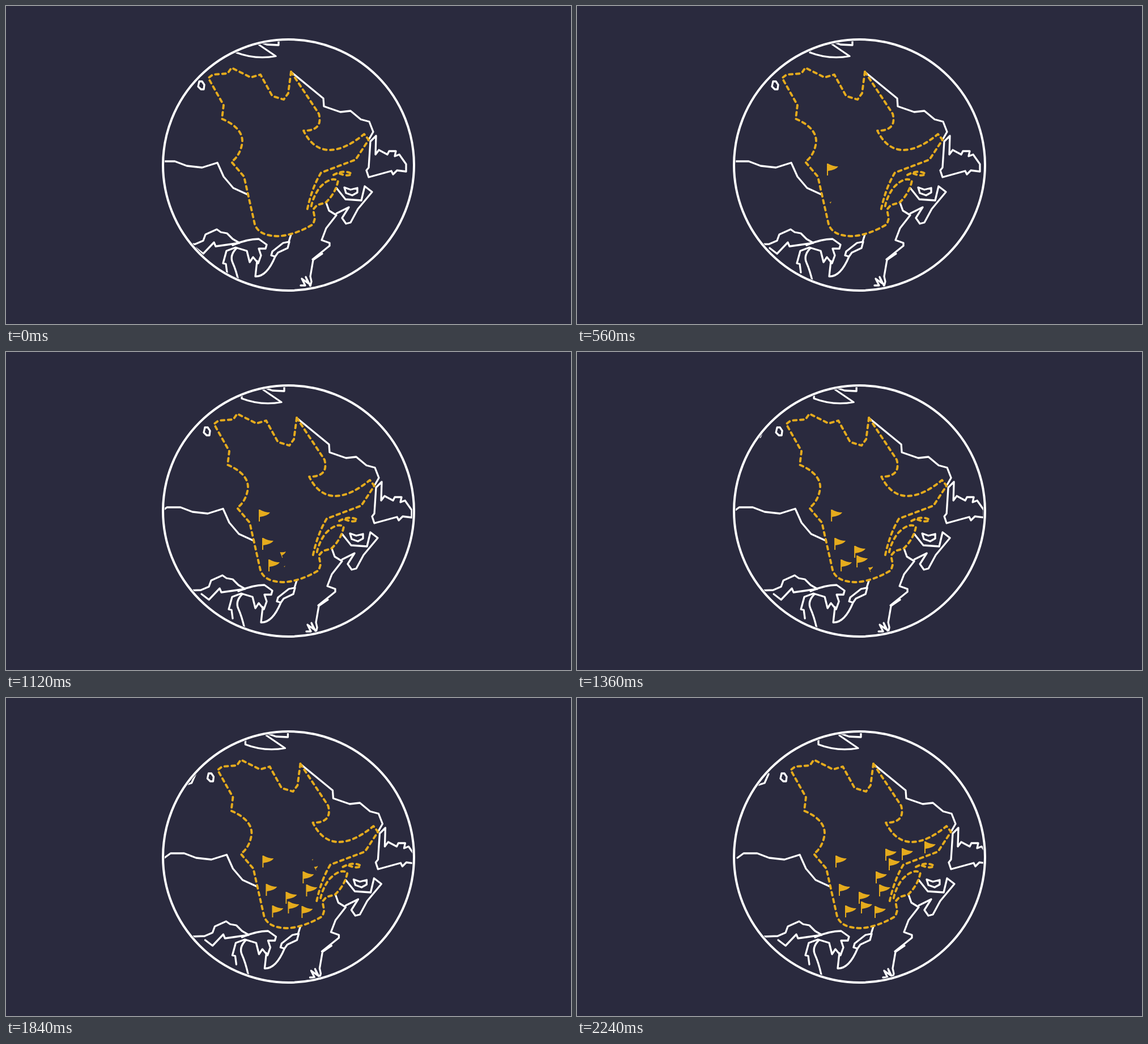
An HTML page for the animation above (2.28 s loop, 997 px wide and 561 px high).

```html
<!DOCTYPE html>
<html lang="en">
<head>
<meta charset="utf-8">
<title>Globe with flags</title>
<style>
  html, body { margin: 0; width: 100%; height: 100%; overflow: hidden; background: #2a2a3e; }
  svg { display: block; width: 997px; height: 561px; fill: none; stroke-linejoin: round; stroke-linecap: round; }
  .line { stroke: #fff; stroke-width: 3.3; }
  .dash { stroke: #e5ab1d; stroke-width: 3.9; stroke-dasharray: 6 6.5; }
  #flags { fill: #e5ab1d; }
</style>
</head>
<body>
<svg viewBox="0 0 997 561">
  <clipPath id="disc"><circle cx="498.5" cy="280.5" r="218.5"/></clipPath>
  <g clip-path="url(#disc)">
    <g id="map">
      <g class="line">
        <!-- northern islands -->
        <path d="M406 70V82Q440 95 476 88.5L443 66M443 62L460 68 481 69V58"/>
        <path d="M341 133H346L350 139 349 147H344L339 142Z"/>
        <path d="M318 134L311 150 298 154"/>
        <!-- western border -->
        <path d="M263 282L274 274H298L319 282 346 285 373 276.5 384 301 401 321 425 332"/>
        <!-- eastern coast and islands -->
        <path d="M505 118L560 163 561 177 590 187 608 185 626 200 641 204 648 222 640 236"/>
        <path d="M653 229L643 239 640 285 636 290 640 302 680 291 683 297 690 290 706 292V279L694 262 686 265 688 256H676L673 262 658 254 652 262Z"/>
        <path d="M583 321L599 341 627 343 633 318 646 328 621 358 608 382 600 384 593 374 605 355 583 366"/>
        <path d="M597 320L608 324 620 321V329L611 334 600 330Z"/>
        <path d="M565 347L570 361 583 369 565 392 557 413 571 418V423L541 447 558 437 542 448 537 477 539 486 537 494 529 478 533 489 522 481 528 493H520"/>
        <!-- lakes -->
        <path d="M503 403L499 416 489 418 470 433 468 440 475 442 480 435 497 427 500 416M475 442Q460 478 440 477L443 450"/>
        <path d="M400 422Q425 411 446 411L460 421 458 428H446L450 440 445 454 436 443 430 452 425 432 405 426 389 432 383 454 388 455 390 470"/>
        <path d="M407 427Q394 440 400 453T411 488"/>
        <path d="M308 421L334 420 348 414 352 403 372 394 379 399 390 401 400 411 412 418 370 424 367 417 348 437 335 427"/>
      </g>
      <g class="dash">
        <path d="M503 116L498 154 490 165 470 159 449 121 432 126 398 109 391 119 365 121 357 127 384 175 381 199Q418 215 417 240 414 263 398 275L420 301 439 385Q446 406 481 406 510 404 542 385L545 375 542 359 549 351 564 347Q582 330 586 308 572 300 553 321 541 338 538 357"/>
        <path d="M503 116L552 190Q560 220 525 220 542 254 571 254 598 254 632 226L640 236 617 271 556 294Q539 322 531 362"/>
        <path d="M578 298Q597 288 610 296 604 302 587 295"/>
      </g>
      <g id="flags"></g>
    </g>
  </g>
  <circle cx="498.5" cy="280.5" r="221.5" stroke="#fff" stroke-width="4"/>
</svg>
<script>
const LOOP = 2280, STEP = 40, SPEED = 20 / 2240, GROW = 240;

// foot x, foot y, start time
const flags = [
  [437, 299, 300], [443, 349, 520], [454, 387, 740], [478, 363, 1000],
  [482, 380, 1090], [506, 388, 1260], [514, 350, 1500], [508, 327, 1540],
  [531, 304, 1760], [525, 287, 1810], [554, 286, 1930], [594, 274, 2000]
].map(([x, y, start]) => {
  const el = document.createElementNS("http://www.w3.org/2000/svg", "path");
  el.setAttribute("d", "M-1-21H1Q9-16 19-16 15-10 1-8V0H-1Z");
  document.getElementById("flags").append(el);
  return { el, x, y, start };
});
const map = document.getElementById("map");

function draw() {
  const t = Math.floor(performance.now() % LOOP / STEP) * STEP;
  map.setAttribute("transform", `translate(${t * SPEED} 0)`);
  for (const { el, x, y, start } of flags) {
    const k = Math.max(0, Math.min(1, (t - start) / GROW));
    el.setAttribute("transform", `translate(${x} ${y}) rotate(${45 * (k - 1)}) scale(${k})`);
  }
  requestAnimationFrame(draw);
}
draw();
</script>
</body>
</html>
```
